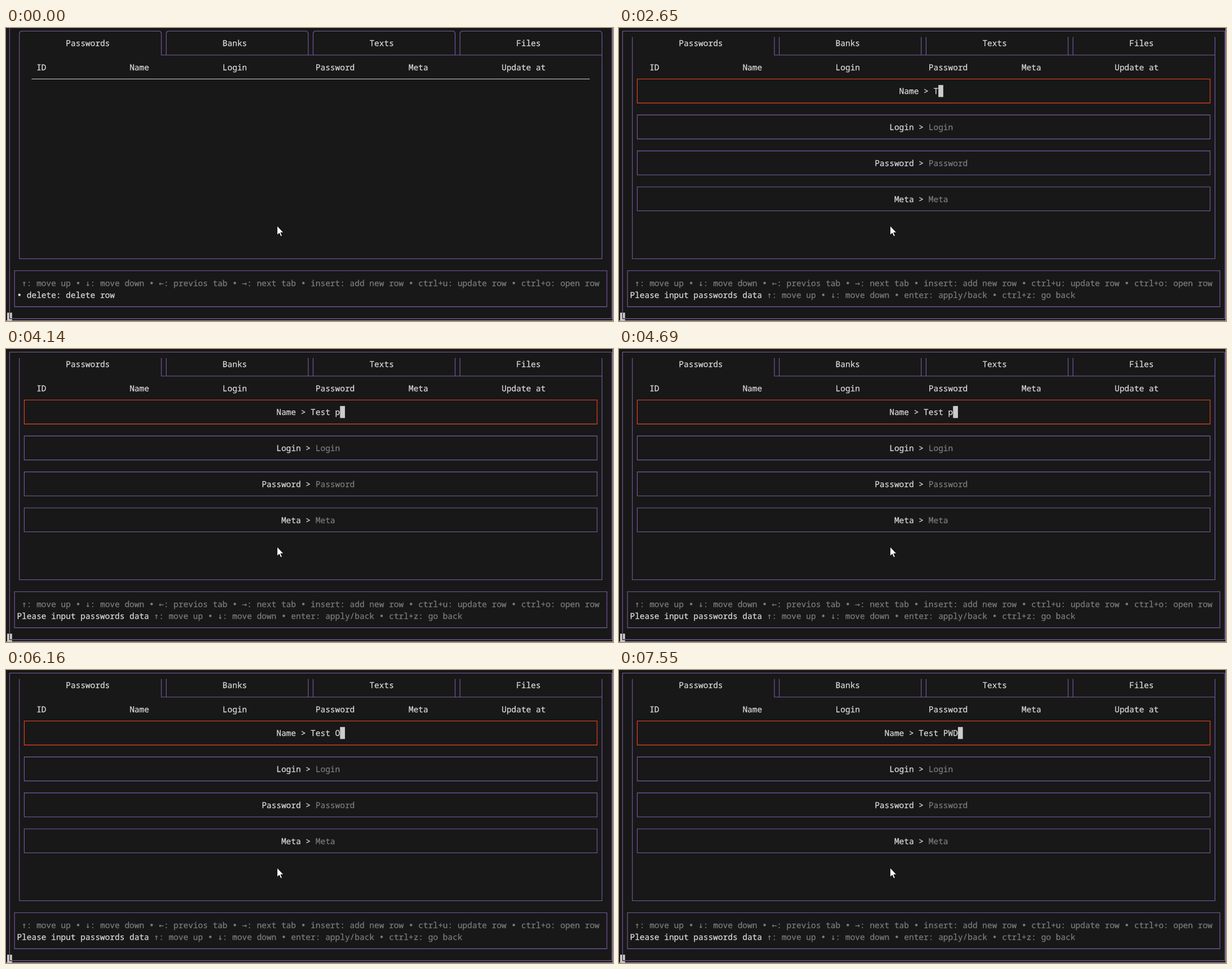
These frames come from a looping animation (1078x520 px, 8 s). An HTML page:

```html
<!DOCTYPE html>
<html lang="en">
<head>
<meta charset="utf-8">
<title>Terminal form</title>
<style>
  html, body { margin: 0; width: 100%; height: 100%; overflow: hidden; background: #181818; }
  svg { display: block; width: 1078px; height: 520px; }
  text {
    font: 14.49px "Noto Sans Mono", "DejaVu Sans Mono", monospace;
    font-variant-ligatures: none;
    text-rendering: geometricPrecision;
    white-space: pre;
    fill: #dadada;
    stroke: #dadada;
    stroke-width: .25;
  }
  text.dim { fill: #7c7c7c; stroke: #7c7c7c; }
  text.inv { fill: #181818; stroke: none; }
  .sym { font-family: "DejaVu Sans Mono", monospace; }
  path { fill: none; stroke: #7a5da3; stroke-width: 1.1; }
  path.focus { stroke: #f0441f; }
  path.rule { stroke: #d0d0d0; }
  path.inv { stroke: #181818; }
  rect { fill: #ccc; }
  .edge { fill: #aaa; }
  .pointer { fill: #fff; stroke: #000; stroke-width: .8; }
</style>
</head>
<body>
<svg id="stage" viewBox="0 0 1078 520">
  <rect class="edge" y="519" width="1078" height="1"/>
  <rect class="edge" x="1077" width="1" height="520"/>
  <g id="base"></g>
  <g id="table"></g>
  <g id="form"></g>
  <path class="pointer" d="M481.5 351v16.4l3.8-3.4 2.6 5.8 2.5-1.1-2.6-5.6h5z"/>
</svg>
<script>
const NS = 'http://www.w3.org/2000/svg';
const CELL = 8.695, ROW = 21.265, LOOP = 8000;
const $ = id => document.getElementById(id);

// Terminal grid to pixels
const left = c => 2 + c * CELL;
const midX = c => left(c + .5);
const midY = r => 5.5 + r * ROW;
const topY = r => midY(r - .5);
const baseline = r => Math.round(midY(r) + 5.5);

function add(parent, tag, attrs, content = '') {
  const el = document.createElementNS(NS, tag);
  for (const k in attrs) el.setAttribute(k, attrs[k]);
  el.textContent = content;
  parent.append(el);
  return el;
}

// Symbols come from another font, so each run starts on its own cell
function put(g, c, r, s, cls = '') {
  const el = add(g, 'text', { x: left(c), y: baseline(r), class: cls });
  for (const run of s.split(/([↑↓←→•])/).filter(Boolean)) {
    add(el, 'tspan', { x: left(c), class: /[↑↓←→•]/.test(run) ? 'sym' : '' }, run);
    c += run.length;
  }
  return el;
}
const line = (g, d, cls = '') => add(g, 'path', { d, class: cls });
const box = (g, c0, r0, c1, r1, cls) =>
  line(g, `M${midX(c0)} ${midY(r0)}H${midX(c1)}V${midY(r1)}H${midX(c0)}Z`, cls);
const block = (g, c, r, height) =>
  add(g, 'rect', { x: left(c), y: topY(r), width: CELL, height });

const base = $('base'), table = $('table'), form = $('form');
const tabs = [[2, 31], [32, 61], [62, 91], [92, 121]];

// Shared frame, tabs, headings and help
line(base, `M${midX(0)} 5V${midY(24)}H${midX(123)}V5`);
line(base, `M${midX(2)} 16V${midY(19)}H${midX(121)}V16`);
line(base, `M${midX(31)} 16V${midY(2)}H${midX(121)}`);
for (const c of [32, 61, 62, 91, 92]) line(base, `M${midX(c)} 16V${midY(2)}`);
box(base, 1, 20, 122, 23);
[['Passwords', 12], ['Banks', 44], ['Texts', 74], ['Files', 104]]
  .forEach(([s, c]) => put(base, c, 1, s));
['ID', 'Name', 'Login', 'Password', 'Meta', 'Update at']
  .forEach((s, i) => put(base, 6 + 19 * i, 3, s));
put(base, 3, 21, '↑: move up • ↓: move down • ←: previos tab • →: next tab • ' +
  'insert: add new row • ctrl+u: update row • ctrl+o: open row', 'dim');

// Empty table view
for (const [a, b] of tabs) {
  const y = midY(0);
  line(table, `M${midX(a)} 16V${y + 5}q0-5 5-5H${midX(b) - 5}q5 0 5 5V16`);
}
for (const c of [0, 123]) line(table, `M${midX(c)} 0V5`);
line(table, `M${left(5)} ${midY(4)}H${left(119)}`, 'rule');
put(table, 2, 22, '• delete: delete row');

// Form view
const startCol = width => 4 + Math.floor((116 - width) / 2);
line(form, `M${midX(0)} ${midY(0)}H${midX(123)}`);
['Name', 'Login', 'Password', 'Meta'].forEach((s, i) => {
  const r = 4 + 3 * i;
  box(form, 3, r, 120, r + 2, i ? '' : 'focus');
  if (!i) return;
  const c = startCol(2 * s.length + 3);
  put(form, c, r + 1, s + ' >');
  put(form, c + s.length + 3, r + 1, s, 'dim');
});
put(form, 2, 22, 'Please input passwords data');
put(form, 30, 22, '↑: move up • ↓: move down • enter: apply/back • ctrl+z: go back', 'dim');

const label = (s, cls) => add(form, 'text', { y: baseline(5), class: cls }, s);
const prompt = label('', '');
const hint = label('Name', 'dim');
const caret = block(form, 0, 5, ROW);
const covered = label('N', 'inv');

// Terminal cursor over the frame's bottom edge, in column 0 or 1
const cursors = [0, 1].map(c => {
  const g = add($('stage'), 'g', {});
  block(g, c, 24, 519 - topY(24));
  const from = c ? `M${left(1)} ${midY(24)}` : `M${midX(0)} ${topY(24)}V${midY(24)}`;
  line(g, `${from}H${left(c + 1)}`, 'inv');
  return g;
});

// time, typed value, terminal cursor column, caret hidden
const steps = [
  [870, ''], [2650, 'T'], [2800, 'Te'], [2920, 'Tes'], [3040, 'Tes', 1],
  [3190, 'Test'], [3310, 'Test '], [3710, 'Test p'], [3860, 'Test pw'],
  [4140, 'Test p'], [4540, 'Test p', 1], [4690, 'Test p'], [4810, 'Test pW'],
  [4930, 'Test pWD'], [5490, 'Test pWD', 0, true], [5610, 'Test pW'],
  [5730, 'Test p'], [5880, 'Test '], [6160, 'Test O'], [6750, 'Test '],
  [7030, 'Test P'], [7150, 'Test P', 1], [7270, 'Test PW'], [7550, 'Test PWD']
];
const show = (el, on) => { el.style.display = on ? '' : 'none'; };
const moveTo = (el, c) => el.setAttribute('x', left(c));

function draw(t) {
  const step = steps.filter(s => s[0] <= t).pop();
  const [, value = '', col = 0, hidden = false] = step || [];
  show(table, !step);
  show(form, step);
  cursors.forEach((g, i) => show(g, i === col));

  const c = startCol(7 + (value.length || 4) + 1);
  const end = c + 7 + value.length;
  prompt.textContent = 'Name > ' + value;
  moveTo(prompt, c);
  for (const el of [hint, caret, covered]) moveTo(el, end);
  show(hint, !value);
  show(covered, !value);
  show(caret, !hidden);
}

const start = performance.now();
function tick() {
  draw((performance.now() - start) % LOOP);
  requestAnimationFrame(tick);
}
tick();
</script>
</body>
</html>
```
